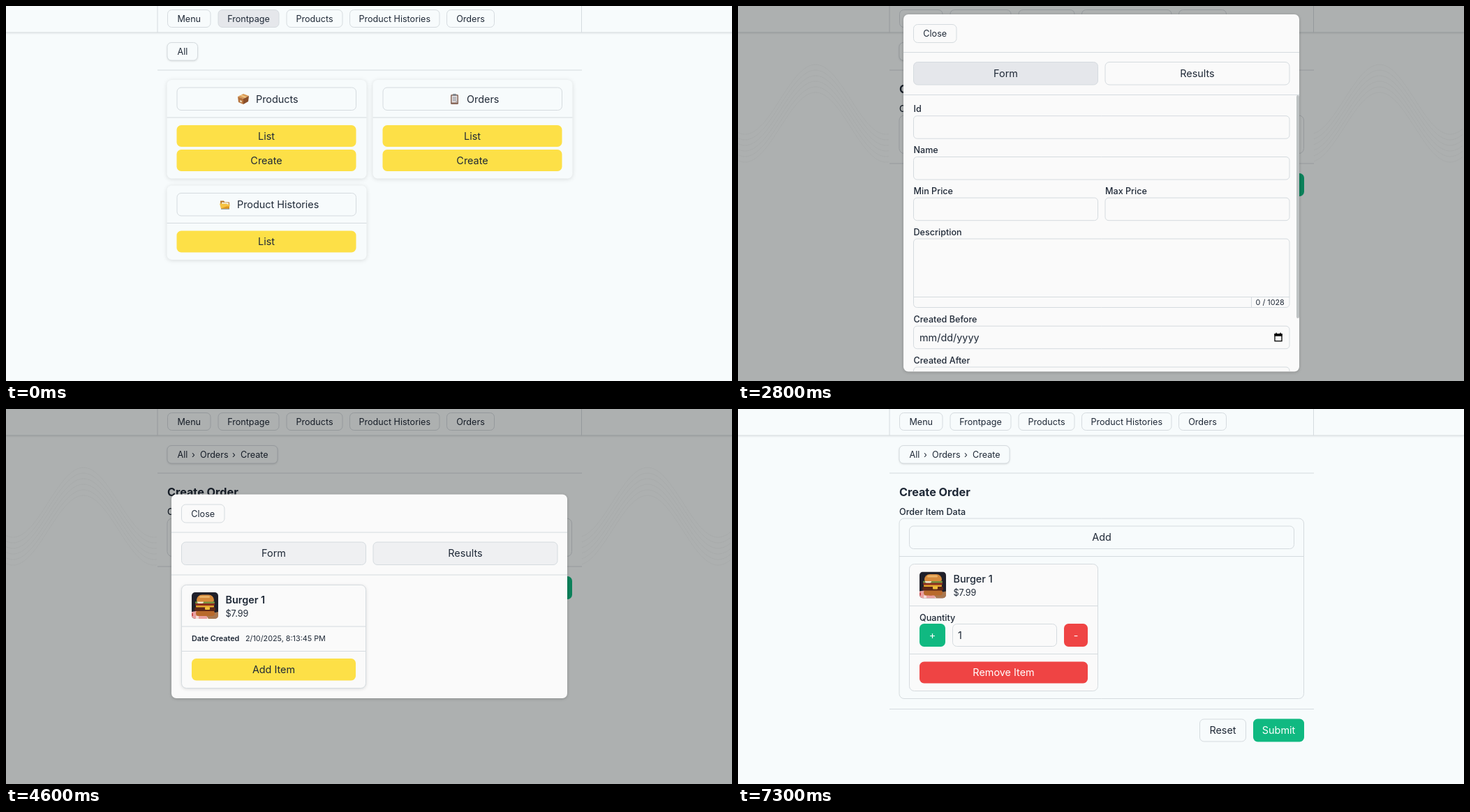
An HTML page with a canvas that plays this animation: 1040 px wide and 538 px high, repeating every 8000 ms.

```html
<!DOCTYPE html>
<html lang="en">
<head>
<meta charset="utf-8">
<title>Order form</title>
<style>
html, body { margin: 0; width: 100%; height: 100%; overflow: hidden; background: #f7fbfc; }
canvas { display: block; }
</style>
</head>
<body>
<canvas id="stage" width="1040" height="538"></canvas>
<script>
const ctx = document.getElementById('stage').getContext('2d');
const LOOP = 8000;
const INK = '#1f2937', LINE = '#d5dbdf', PAGE = '#f7fbfc', PANEL = '#fafafa';
const YELLOW = '#fde047', GREEN = '#10b981', RED = '#ef4444', GRAY = '229,231,235';
const SMALL = 12.6, BASE = 14.4, TINY = 10.8;

function box(x, y, w, h, r, fill, stroke, shadow) {
  ctx.save();
  ctx.beginPath();
  ctx.roundRect(x, y, w, h, r);
  if (shadow) {
    ctx.shadowColor = 'rgba(0,0,0,' + shadow[0] + ')';
    ctx.shadowBlur = shadow[1];
    ctx.shadowOffsetY = shadow[2];
  }
  if (fill) { ctx.fillStyle = fill; ctx.fill(); }
  ctx.shadowColor = 'transparent';
  if (stroke) { ctx.strokeStyle = stroke; ctx.lineWidth = 1; ctx.stroke(); }
  ctx.restore();
}

// y is the middle of the capital letters
function text(s, x, y, size = BASE, weight = 400, align = 'left', color = INK) {
  ctx.font = `${weight} ${size}px Inter, sans-serif`;
  ctx.textAlign = align;
  ctx.fillStyle = color;
  ctx.fillText(s, x, y + size * 0.364);
}

function hline(x1, x2, y, color = LINE) {
  ctx.fillStyle = color;
  ctx.fillRect(x1, y - 0.5, x2 - x1, 1);
}

function vline(x, y1, y2) {
  ctx.fillStyle = LINE;
  ctx.fillRect(x - 0.5, y1, 1, y2 - y1);
}

function poly(color, ...pts) {
  ctx.fillStyle = color;
  ctx.beginPath();
  for (let i = 0; i < pts.length; i += 2) ctx.lineTo(pts[i], pts[i + 1]);
  ctx.fill();
}

function outlined(s, x, y, w, h = 32.5, fill = null, size = BASE, shadow = null) {
  box(x, y, w, h, 6, fill, LINE, shadow);
  text(s, x + w / 2, y + h / 2, size, 400, 'center');
}

function solid(s, x, y, w, h, fill, color = '#fff') {
  box(x, y, w, h, 6.5, fill);
  text(s, x + w / 2, y + h / 2, BASE, 400, 'center', color);
}

function resetSubmit(right, y) {
  outlined('Reset', right - 149.5, y + 0.5, 66, 32);
  solid('Submit', right - 73, y, 73, 33, GREEN);
}

const icons = {
  parcel() {
    poly('#d99a55', 0, 4, 8, 0, 16, 3, 8, 7);
    poly('#b5713a', 0, 4, 8, 7, 8, 15, 1, 12);
    poly('#8a4f2a', 8, 7, 16, 3, 15, 11, 8, 15);
    poly('#efc789', 3, 2.6, 5.5, 1.4, 13, 4.5, 10.5, 5.7);
    poly('#e8d3b0', 3, 9, 6, 10, 6, 12.5, 3, 11.5);
  },
  clipboard() {
    box(2, 1, 11, 14, 1.5, '#8b6a5c');
    box(3.5, 2.5, 8, 10, 0.5, '#ded9da');
    box(5, 0, 5, 3, 1, '#80868c');
    for (let i = 0; i < 3; i++) hline(5, 10, 5.5 + i * 2, '#979ca3');
    poly('#aaa2a5', 8, 12.5, 11.5, 9.5, 11.5, 12.5);
  },
  folder() {
    poly('#b87522', 1, 2, 6, 2, 7.5, 4, 14, 4, 14, 13, 2, 13);
    poly('#f5f5ee', 3, 4, 13, 5, 13, 9, 3, 9);
    poly('#4b5a60', 2, 13, 14, 13, 14, 14, 2, 14);
    poly('#f6c343', 0, 6, 9, 6, 15, 8, 13, 13, 2, 13);
    poly('#dc9420', 2, 13, 10, 10, 14.2, 10, 13, 13);
  }
};

function drawIcon(name, x, y) {
  ctx.save();
  ctx.translate(x, y);
  icons[name]();
  ctx.restore();
}

function burger(x, y) {
  ctx.save();
  ctx.beginPath();
  ctx.roundRect(x, y, 38, 38, 5);
  ctx.clip();
  ctx.translate(x, y);
  ctx.fillStyle = '#20202a';
  ctx.fillRect(0, 0, 38, 38);
  poly('#e9a0a0', 0, 28, 12, 26, 38, 30, 38, 38, 0, 38);
  for (let i = 0; i < 5; i++) box(i * 8 - 2, 30 + (i % 2) * 4, 4, 4, 0, i % 2 ? '#f4dcd8' : '#c94b50');
  poly('#a97850', 20, 32, 38, 28, 38, 38, 24, 38);
  box(6, 26, 27, 8, 4, '#b96a2c');
  box(4, 21, 30, 6, 3, '#5c2718');
  box(6, 18.5, 26, 3, 1, '#e4a62f');
  box(5, 15, 28, 4, 2, '#8d2f20');
  box(5, 13, 28, 3, 1.5, '#77923f');
  box(8, 12, 9, 4, 2, '#eee5cc');
  box(19, 21, 7, 4, 1, '#f0bd3c');
  box(7, 3.5, 25, 10, [11, 11, 3, 3], '#d68a3c');
  box(11, 5, 15, 3, 2, '#eab267');
  ctx.restore();
}

function header(frontFill) {
  box(0, 37.5, 1040, 1, 0, LINE, null, [0.12, 2, 1]);
  vline(217, 0, 38);
  vline(824.5, 0, 38);
  const tabs = [['Menu', 231.5, 61.5], ['Frontpage', 304, 87], ['Products', 402, 80],
    ['Product Histories', 492.5, 128.5], ['Orders', 631.5, 68]];
  for (const [s, x, w] of tabs) {
    outlined(s, x, 5.5, w, 25, s === 'Frontpage' ? `rgba(${GRAY},${frontFill})` : null, SMALL);
  }
  hline(217, 825, 92);
}

function crumbs(w, parts) {
  box(231, 52.5, w, 25.5, 6, PAGE, LINE, [0.16, 3, 1]);
  for (const [s, x] of parts) text(s, x, 65.2, SMALL);
}

function menuCard(x, y, title, icon, iconX, textX, actions) {
  const h = 71.5 + actions.length * 35;
  box(x, y, 286, h, 7, PAGE, null, [0.13, 6, 1]);
  box(x + 14.5, y + 11, 256.5, 32.5, 6, null, LINE);
  drawIcon(icon, iconX, y + 20);
  text(title, textX, y + 27.3);
  hline(x, x + 286, y + 54);
  actions.forEach((s, i) => solid(s, x + 14, y + 65 + i * 35, 257, 31, YELLOW, INK));
}

function frontPage() {
  header(1);
  crumbs(43.5, [['All', 245.5]]);
  menuCard(230.5, 106, 'Products', 'parcel', 332, 358, ['List', 'Create']);
  menuCard(525.5, 106, 'Orders', 'clipboard', 635, 660, ['List', 'Create']);
  menuCard(230.5, 257.5, 'Product Histories', 'folder', 306, 331, ['List']);
}

function orderPage(added, frontFill) {
  header(frontFill);
  crumbs(158, [['All', 245.5], ['›', 266], ['Orders', 278], ['›', 324], ['Create', 336]]);
  text('Create Order', 231, 119, 16.2, 700);
  text('Order Item Data', 231, 147.2, SMALL, 500);
  box(231, 157, 579.5, added ? 258.5 : 54.5, 7, null, LINE);
  outlined('Add', 245.5, 168, 551, 32.5);
  if (added) {
    hline(231, 811, 211.5);
    itemCard();
  }
  const y = added ? 204.5 : 0;
  hline(217, 825, 226 + y);
  resetSubmit(811, 240 + y);
}

function itemCard() {
  box(245.5, 222.5, 270, 182, 7, PANEL, LINE);
  burger(260, 233.5);
  text('Burger 1', 308.5, 244, BASE, 500);
  text('$7.99', 308.5, 263.3, SMALL);
  hline(246, 515, 282.5);
  text('Quantity', 260, 299.2, SMALL, 500);
  solid('+', 260, 308, 37, 33, GREEN);
  box(307.5, 308.5, 149, 32, 6, null, LINE);
  text('1', 315, 325);
  solid('-', 467, 308, 34, 33, RED);
  hline(246, 515, 351.5);
  solid('Remove Item', 260, 362.5, 241, 31, RED);
}

// Fine zigzag lines beside the page column
function waves() {
  ctx.strokeStyle = 'rgba(90,95,95,0.06)';
  ctx.lineWidth = 1;
  for (const [a, b] of [[0, 217], [825, 1040]]) {
    for (let i = 0; i < 6; i++) {
      ctx.beginPath();
      for (let x = a; x <= b; x += 3) {
        ctx.lineTo(x, 134 + i * 8 + 50 * Math.cos((x - 10) / 202 * 2 * Math.PI));
      }
      ctx.stroke();
    }
  }
}

function modal(y, h, results) {
  ctx.fillStyle = 'rgba(0,0,0,0.3)';
  ctx.fillRect(0, 0, 1040, 538);
  waves();
  box(237, y, 567, h, 7, PANEL, null, [0.2, 4, 1]);
  outlined('Close', 251.5, y + 14.5, 61.5, 26, null, SMALL, null);
  hline(237, 804, y + 54.5);
  outlined('Form', 251.5, y + 68.5, 264, 32.5, `rgba(${GRAY},${1 - results})`);
  outlined('Results', 526, y + 68.5, 264, 32.5, `rgba(${GRAY},${results})`);
  hline(237, 804, y + 115.5);
}

function field(label, x, y, w, h = 32.5) {
  text(label, x, y, SMALL, 500);
  box(x, y + 10, w, h, 5, null, LINE);
}

function dateField(label, y) {
  field(label, 251.5, y, 538.5);
  text('mm/dd/yyyy', 260, y + 26.3);
  ctx.strokeStyle = '#000';
  ctx.lineWidth = 1.3;
  ctx.strokeRect(769, y + 21.5, 10, 10);
  ctx.fillStyle = '#000';
  ctx.fillRect(768.5, y + 21, 11, 3.5);
  ctx.fillRect(770.3, y + 19.5, 1.4, 2);
  ctx.fillRect(776.3, y + 19.5, 1.4, 2);
}

function searchForm(scroll, barAlpha) {
  modal(12, 512.5, 0);
  ctx.save();
  ctx.beginPath();
  ctx.rect(237, 128, 567, 396);
  ctx.clip();
  ctx.save();
  ctx.translate(0, -scroll);
  field('Id', 251.5, 147.7, 538.5);
  field('Name', 251.5, 206.5, 538.5);
  field('Min Price', 251.5, 265.2, 264);
  field('Max Price', 526, 265.2, 264);
  field('Description', 251.5, 324, 538.5, 98.5);
  hline(252, 790, 417.5);
  vline(735.5, 417.5, 432);
  text('0 / 1028', 782.8, 425, TINY, 400, 'right');
  dateField('Created Before', 449.2);
  dateField('Created After', 508);
  hline(251, 790, 560.5);
  resetSubmit(790, 571.5);
  ctx.restore();
  box(800, 128 + scroll * 0.81, 4, 320, 2, `rgba(190,194,195,${barAlpha})`);
  ctx.restore();
}

function resultList(added, tab) {
  const y = added ? 122 : 122.5;
  modal(y, added ? 293.5 : 292.5, tab);
  box(251.5, y + 130, 264, added ? 149.5 : 148, 7, PANEL, LINE, added ? null : [0.14, 5, 1]);
  burger(266, y + 140.5);
  text('Burger 1', 314.5, y + 151, BASE, 600);
  text('$7.99', 314.5, y + 170.5, SMALL);
  hline(252, 515, y + 189.5);
  text('Date Created', 266, y + 207, TINY, 600);
  text('2/10/2025, 8:13:45 PM', 343, y + 207, TINY);
  hline(252, 515, y + 225);
  if (added) {
    outlined('x1', 266, 357.5, 42.5, 32.5);
    solid('Already Added', 319, 357.5, 182, 32.5, GREEN);
  } else {
    solid('Add Item', 266, 358, 235, 31.5, YELLOW, INK);
  }
}

function draw(t) {
  ctx.fillStyle = PAGE;
  ctx.fillRect(0, 0, 1040, 538);
  if (t < 1400) return frontPage();
  orderPage(t >= 6200, t < 1500 ? 0.5 : 0);
  if (t < 2800 || t >= 7300) return;
  if (t < 4600) {
    const k = Math.min(3, Math.max(0, Math.floor((t - 3400) / 100))) / 3;
    const bar = t < 4100 ? 1 : t < 4200 ? 0.5 : 0;
    searchForm(94 * (1 - (1 - k) ** 2), bar);
  } else {
    resultList(t >= 6200, t < 4700 ? 0.5 : 1);
  }
}

const start = performance.now();
function tick() {
  draw((performance.now() - start) % LOOP);
  requestAnimationFrame(tick);
}
tick();
</script>
</body>
</html>
```
